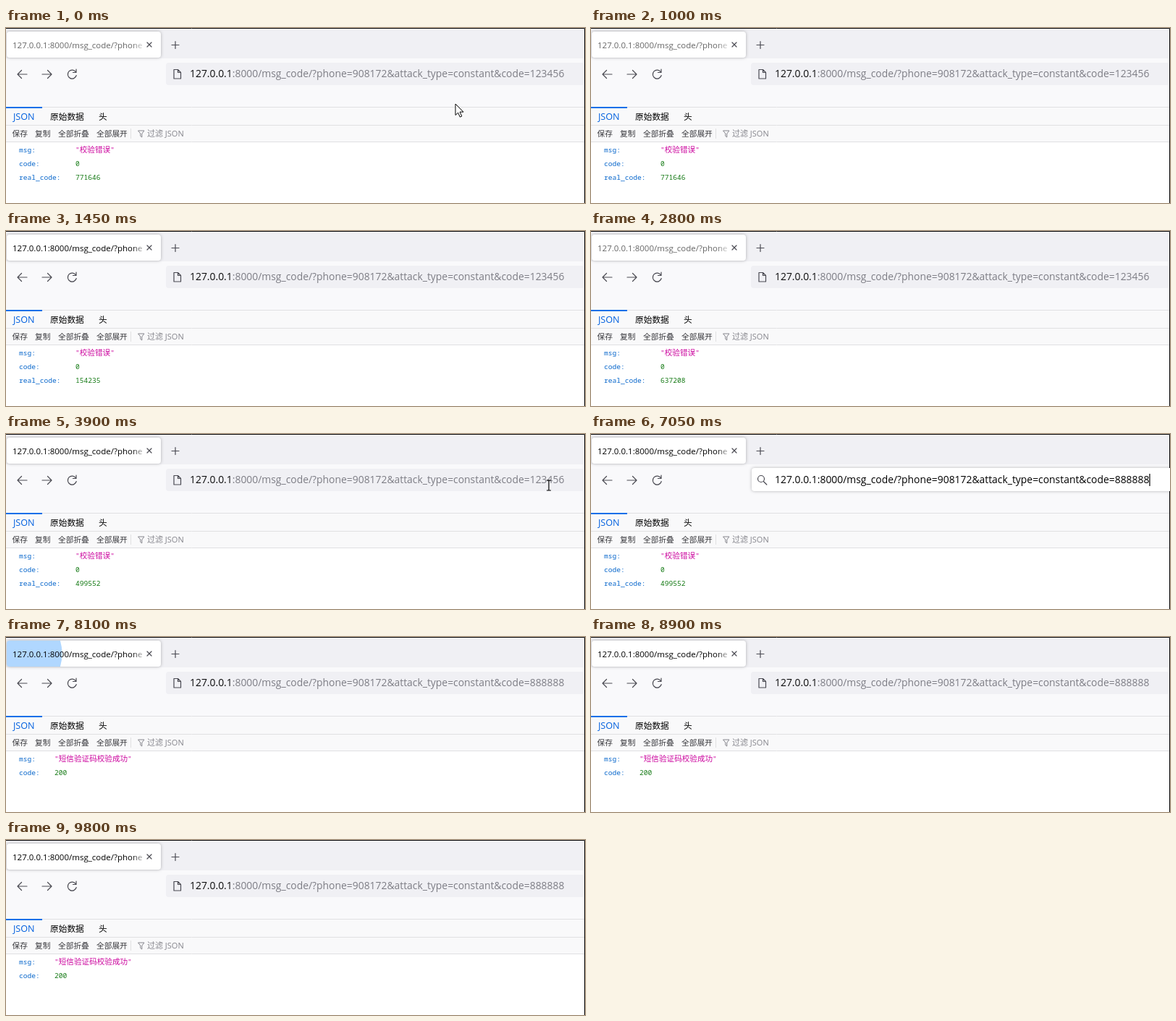
Animation, 800 px wide and 242 px high, one loop 9.85 s. Source, as an HTML page:

```html
<!DOCTYPE html>
<html lang="zh">
<head>
<meta charset="utf-8">
<title>Code check</title>
<style>
  html, body { margin: 0; width: 100%; height: 100%; overflow: hidden; background: #fff; }
  svg { display: block; width: 100%; height: 100%; }
  text { font-family: "Open Sans", "Noto Sans", "Noto Sans CJK SC", "Noto Sans CJK", sans-serif; white-space: pre; }
  .url { font-size: 13.9px; fill: #0c0c0d; }
  .rest { fill: #7d7d85; }
  .focused, .focused .rest { fill: #000; }
  .tabs { font-size: 11.7px; }
  .tools { font-size: 10.7px; fill: #38383d; }
  .json text { font-family: "Noto Sans Mono", "DejaVu Sans Mono", "Noto Sans CJK SC", "Noto Sans CJK", monospace; font-size: 9.6px; }
  .json .key { fill: #0a68cc; }
  .json .str { fill: #cc089f; }
  .json .num { fill: #157a15; }
  .cjk { font-size: 10.6px; }
  .line { fill: none; stroke: #4a4a52; stroke-width: 1.2; stroke-linecap: round; stroke-linejoin: round; }
  .raised { filter: drop-shadow(0 0 2px rgba(0, 0, 0, .28)); }
  .floating { filter: drop-shadow(0 1px 5px rgba(0, 0, 0, .18)); }
</style>
</head>
<body>
<svg viewBox="0 0 800 242">
  <defs>
    <linearGradient id="fade" gradientUnits="userSpaceOnUse" x1="174" x2="194">
      <stop/><stop offset="1" stop-opacity="0"/>
    </linearGradient>
    <clipPath id="tabClip"><rect x="1" y="5" width="213" height="36" rx="4"/></clipPath>
  </defs>

  <!-- Browser frame -->
  <rect width="800" height="242" fill="#fff"/>
  <rect width="800" height="42" fill="#f0f0f4"/>
  <rect y="42" width="800" height="68" fill="#f9f9fb"/>
  <rect class="raised" x="1" y="5" width="213" height="36" rx="4" fill="#fff"/>
  <g clip-path="url(#tabClip)"><circle id="burst" cx="12" cy="23" fill="#0a84ff"/></g>
  <text id="title" x="9" y="28" font-size="11.5" fill="url(#fade)">127.0.0.1:8000/msg_code/?phone</text>
  <path class="line" d="M195 20l6 6m0-6l-6 6M229 23.5h10m-5-5v10"/>
  <path class="line" d="M29 64H16m5.5-5.5L16 64l5.5 5.5M50 64h13m-5.5-5.5L63 64l-5.5 5.5"/>
  <path class="line" d="M96.500 61a6 6 0 1 0 .7 4.500M97 57v4.500h-4.500"/>

  <!-- JSON viewer -->
  <g id="viewer">
    <rect y="110" width="800" height="48" fill="#f9f9fa"/>
    <path d="M0 109.500H800M0 134.500H800M0 157.500H800M172.500 139v14" stroke="#e0e0e2"/>
    <rect y="109" width="50" height="2" fill="#0a6fe8"/>
    <g class="tabs">
      <text x="10" y="127" font-size="12.6" fill="#0060df">JSON</text>
      <text x="61" y="127">原始数据</text>
      <text x="128" y="127">头</text>
    </g>
    <g class="tools">
      <text x="8.5" y="150">保存</text>
      <text x="40" y="150">复制</text>
      <text x="72" y="150">全部折叠</text>
      <text x="125" y="150">全部展开</text>
      <path d="M182.500 142h8.500l-3.200 4v5l-2-1.500V146z" fill="none" stroke="#85858c"/>
      <text x="195" y="150" font-size="11" fill="#85858c">过滤 JSON</text>
    </g>
    <g class="json">
      <text class="key" x="18" y="172">msg:</text>
      <text class="key" x="18" y="191">code:</text>
      <text class="str value" y="172">"<tspan id="msg" class="cjk"></tspan>"</text>
      <text id="status" class="num value" y="191"></text>
      <g id="realRow">
        <text class="key" x="18" y="210">real_code:</text>
        <text id="real" class="num" x="96" y="210"></text>
      </g>
    </g>
  </g>
  <path d="M0 .5H799.500V242" fill="none" stroke="#0a0a0c"/>

  <!-- Address bar -->
  <rect id="barIdle" x="221" y="48" width="578" height="31" rx="4" fill="#f0f0f4"/>
  <rect id="barFocus" class="raised" x="222" y="47" width="590" height="32" rx="4" fill="#fff"/>
  <g id="panel">
    <rect class="floating" x="222" y="45" width="590" height="126" rx="4" fill="#fff"/>
    <path d="M226 83.500H800M226 125.500H800" stroke="#f0f0f4"/>
    <rect x="223" y="89" width="590" height="31" rx="4" fill="#e0e0e6"/>
    <g class="line">
      <g stroke-width="1">
        <circle cx="236.500" cy="105" r="6.500"/>
        <ellipse cx="236.500" cy="105" rx="2.800" ry="6.500"/>
        <path d="M230.500 105h12"/>
      </g>
      <rect x="422.500" y="144.500" width="15" height="11" rx="2"/>
      <circle cx="468" cy="150" r="7"/>
      <path d="M468 146v4l2.500 2.500"/>
    </g>
    <text class="url" x="254" y="109"><tspan id="suggestion"></tspan><tspan fill="#6b6b74"> —</tspan></text>
    <text x="229" y="154" font-size="12.3" fill="#5b5b66">本次搜索使用:</text>
    <circle cx="352.500" cy="150" r="6" fill="#3a46e0"/>
    <path id="star" fill="#0060df"/>
  </g>
  <path id="pageIcon" class="line" d="M232 57.500h5.500l4 4V70h-9.500zM237.500 57.500v4h4"/>
  <path id="searchIcon" class="line" d="M239.500 62a4.500 4.500 0 1 0-9 0a4.500 4.500 0 1 0 9 0M238.300 65.500l4.500 4.500"/>
  <rect id="selection" y="54" height="18" fill="#0078d7"/>
  <text id="url" class="url" x="254" y="68"><tspan id="host">127.0.0.1</tspan><tspan id="path" class="rest"></tspan><tspan id="code" class="rest"></tspan></text>
  <rect id="caret" y="55" width="1.200" height="17" fill="#000"/>

  <path id="arrow" d="M0 0V15.500l3.600-3.400 2.700 6 2.500-1.100-2.700-5.900H11z" fill="#fff" stroke="#000"/>
  <path id="beam" d="M-3-7h2.500L0-6.500.5-7H3M0-6.500v13M-3 7h2.500L0 6.500.5 7H3" fill="none" stroke="#000" stroke-width="1.200"/>
</svg>
<script>
const LOOP = 9850, STEP = 50, BURST = 400;
const $ = id => document.getElementById(id);
const show = (id, on) => $(id).style.display = on ? '' : 'none';
const within = (t, from, to) => t >= from && t < to;
const progress = (t, from, to) => Math.min(1, Math.max(0, (t - from) / (to - from)));
const mix = (a, b, p) => a + (b - a) * p;
const place = (id, x, y) => $(id).setAttribute('transform', `translate(${x} ${y})`);
const latest = (list, t) => list.filter(([at]) => at <= t).pop()[1];

const PATH = ':8000/msg_code/?phone=908172&attack_type=constant&code=';
const LOADS = [[0, 100], [1000, 1050], [2300, 2350], [2800, 2850], [3250, 3300],
  [7100, 7200], [7800, 7950], [8400, 8500], [8950, 9050], [9600, 9800]];
const BLANKS = [1050, 2350, 2850, 3250, 7150, 8450, 9000];
const REAL_CODES = [[0, '771646'], [1050, '154235'], [2350, '637208'], [2850, '280914'], [3250, '499552']];
const KEYS = [5150, 5350, 5650, 6050, 6400, 6850];

$('path').textContent = PATH;
$('star').setAttribute('d', 'M' + Array.from({ length: 10 }, (_, i) => {
  const r = i % 2 ? 3.9 : 8, a = i * Math.PI / 5;
  return `${391 + r * Math.sin(a)} ${150 - r * Math.cos(a)}`;
}).join('L') + 'z');

function drawTab(t) {
  $('title').style.opacity = LOADS.some(([busy, done]) => within(t, busy, done)) ? 0.6 : 1;
  const load = LOADS.slice(1, -1).find(([, done]) => within(t, done, done + BURST));
  show('burst', load);
  if (!load) return;
  const p = (t - load[1]) / BURST;
  $('burst').setAttribute('r', 5 + 430 * p * p);
  $('burst').setAttribute('opacity', 0.32 * Math.min(1, (1 - p) * 1.6));
}

function drawViewer(t) {
  const success = t >= 7200;
  show('viewer', !BLANKS.some(at => within(t, at, at + STEP)));
  $('msg').textContent = success ? '短信验证码校验成功' : '校验错误';
  $('status').textContent = success ? '200' : '0';
  $('real').textContent = latest(REAL_CODES, t);
  show('realRow', !success);
  document.querySelectorAll('.value').forEach(v => v.setAttribute('x', success ? 67 : 96));
}

function drawAddress(t) {
  const code = t < KEYS[0] ? '123456' : '8'.repeat(KEYS.filter(at => at <= t).length);
  const focused = within(t, 4050, 7100);
  const open = within(t, KEYS[0], 7050);
  const selected = within(t, 4050, 4250) ? 'all' : within(t, 4250, KEYS[0]) ? 'code' : '';
  $('code').textContent = code;
  $('suggestion').textContent = 'http://127.0.0.1' + PATH + code;
  $('url').classList.toggle('focused', focused);
  show('barIdle', !focused);
  show('barFocus', focused && !open);
  $('barFocus').style.opacity = progress(t, 3950, 4200);
  show('panel', open);
  show('pageIcon', !focused);
  show('searchIcon', focused);

  const width = $('url').getComputedTextLength();
  const start = selected === 'all' ? 0 : width - $('code').getComputedTextLength();
  show('selection', selected);
  $('selection').setAttribute('x', 254 + start);
  $('selection').setAttribute('width', width - start);
  $('host').style.fill = $('path').style.fill = selected === 'all' ? '#fff' : '';
  $('code').style.fill = selected ? '#fff' : '';
  show('caret', within(t, KEYS[0], 7100) && !within(t, 6200, 6400) && !within(t, 6700, 6850));
  $('caret').setAttribute('x', 254 + width);
}

function drawPointer(t) {
  const leaving = progress(t, 50, 650), entering = progress(t, 2850, 3300);
  show('arrow', t < 650 || within(t, 2850, 3300));
  if (t < 650) place('arrow', mix(621, 801, leaving), mix(105, 84, leaving));
  else place('arrow', mix(801, 748, entering), mix(96, 84, entering));
  show('beam', within(t, 3300, KEYS[0]));
  place('beam', mix(747, 750, progress(t, 3300, 3900)), mix(77, 71, progress(t, 3300, 3900)));
}

function draw(now) {
  const t = Math.floor(now % LOOP / STEP) * STEP;
  drawTab(t);
  drawViewer(t);
  drawAddress(t);
  drawPointer(t);
}

const began = performance.now();
function tick() {
  draw(performance.now() - began);
  requestAnimationFrame(tick);
}
tick();
</script>
</body>
</html>
```
